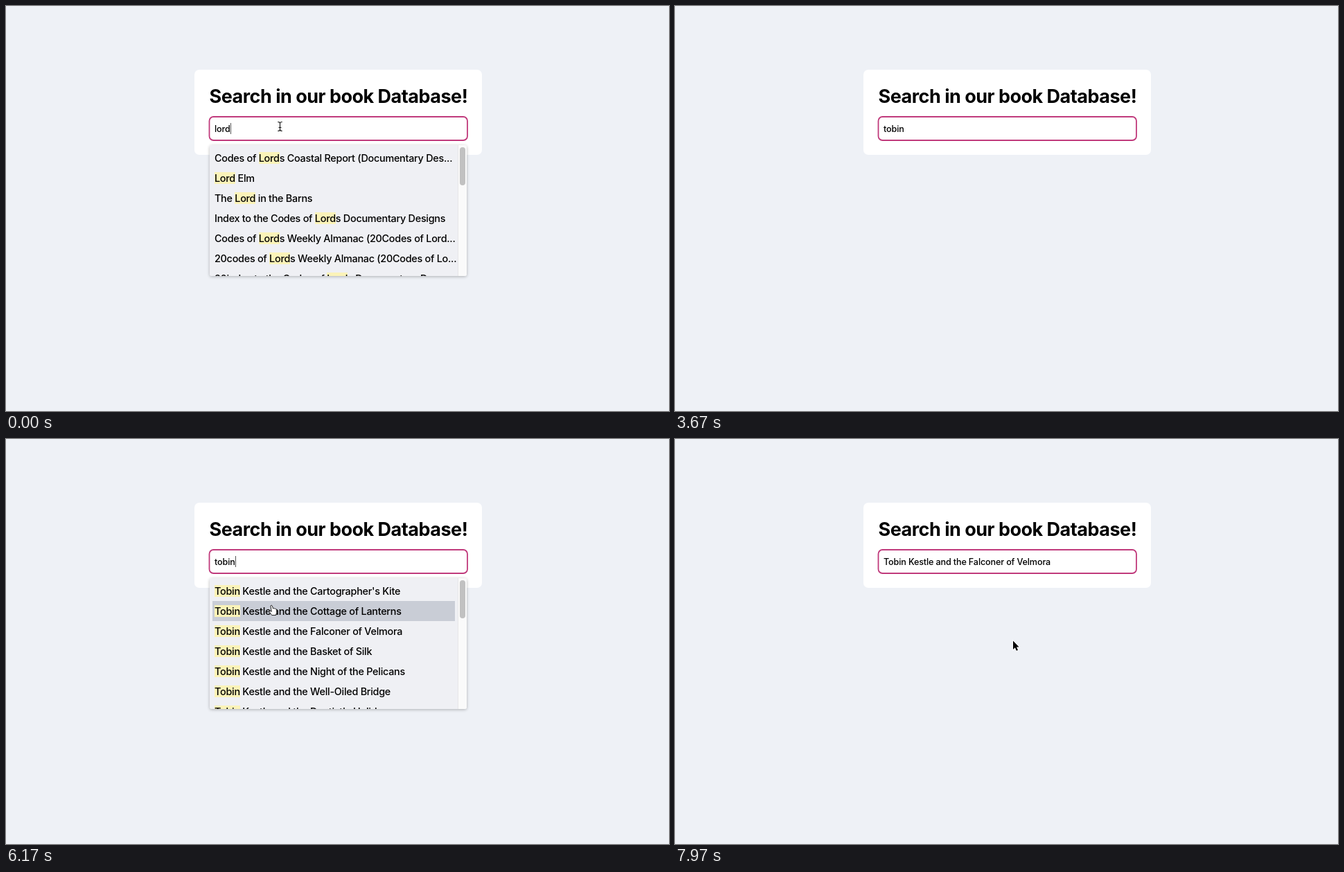
These frames come from a looping animation (957x585 px, 8 s). An HTML page:

```html
<!DOCTYPE html>
<html lang="en">
<head>
<meta charset="utf-8">
<title>Book search</title>
<style>
  html, body { margin: 0; width: 100%; height: 100%; overflow: hidden; background: #eef1f6; }
  body { position: relative; color: #000; font-family: Inter, sans-serif; font-weight: 450; font-optical-sizing: none; }
  body * { position: absolute; box-sizing: border-box; white-space: pre; }
  #card { left: 272px; top: 92px; width: 415px; height: 123px; border-radius: 7px; background: #fff; }
  h1 { left: 21.5px; top: 18.5px; margin: 0; font: 700 27px/40px Inter, sans-serif; letter-spacing: -.0185em; }
  #field { left: 0; top: 0; width: 100%; height: 100%; fill: none; stroke: #c03a7c; stroke-width: 1.8; }
  #query { left: 29px; top: 75.5px; height: 19px; font-size: 12.6px; line-height: 19px; letter-spacing: -.14px; }
  #query.selected { background: #a9cdf4; }
  #caret { left: 100%; top: 1.5px; width: 1px; height: 16px; background: #555; }
  #list { left: 294px; top: 201px; width: 371px; height: 189px; overflow: hidden; border-radius: 3px; background: #eff0f4; }
  #shadow { left: 294px; top: 201px; width: 371px; height: 189px; border-radius: 3px; box-shadow: 0 1px 4px rgba(0, 0, 0, .28); }
  .row { left: 3.5px; width: 350.5px; height: 29.1px; padding-left: 3.5px; font-size: 14.4px; line-height: 29.1px; letter-spacing: -.27px; }
  .row.hover { background: #c9cdd6; }
  .row mark { position: static; color: inherit; background: #fbf3b8; }
  #track { right: 0; top: 0; width: 13px; height: 100%; border-left: 1px solid #e6e6e8; background: #fafafa; }
  #thumb { left: 2px; top: 3px; width: 8px; height: 55px; border-radius: 4px; background: #c1c1c1; }
  #mouse { left: 0; top: 0; width: 20px; height: 24px; overflow: visible; }
</style>
</head>
<body>
<div id="card">
  <h1>Search in our book Database!</h1>
  <svg id="field"><rect x="21.5" y="68" width="372.5" height="34" rx="6"/></svg>
  <span id="query"><span id="text" style="position:static"></span><i id="caret"></i></span>
</div>
<div id="shadow"></div>
<div id="list"><div id="rows"></div><div id="track"><div id="thumb"></div></div></div>
<svg id="mouse">
  <g id="ibeam" fill="none" stroke-linecap="round">
    <path d="M-2.8-6.5Q0-6.5 0-4.5Q0-6.5 2.8-6.5M0-4.5V4.5M-2.8 6.5Q0 6.5 0 4.5Q0 6.5 2.8 6.5M-1.5 1.5H1.5" stroke="#fff" stroke-width="2.4"/>
    <path d="M-2.8-6.5Q0-6.5 0-4.5Q0-6.5 2.8-6.5M0-4.5V4.5M-2.8 6.5Q0 6.5 0 4.5Q0 6.5 2.8 6.5M-1.5 1.5H1.5" stroke="#111" stroke-width="1.1"/>
  </g>
  <path id="arrow" d="M0-.5V12L2.8 9.3L4.8 13.8L7 12.9L5 8.6H8.6Z" fill="#000" stroke="#fff" stroke-width="1.6" paint-order="stroke"/>
  <path id="hand" d="M-1.6 1Q-.3-.8 .8 1L2 5Q3.2 3.8 3.8 5Q5 4.2 5.6 5.6Q7 5.2 7.2 7V10.5L6 14.5H.2L-3.4 9.6Q-3.4 7.6 -1.4 8.4L-.2 9.4Z" fill="#fff" stroke="#111" stroke-width=".9" stroke-linejoin="round"/>
</svg>
<script>
const $ = id => document.getElementById(id);
const LOOP = 8000, ROW_TOP = 204.5, ROW_HEIGHT = 29.1;

const results = {
  lord: [
    "Codes of Lords Coastal Report (Documentary Des...",
    "Lord Elm",
    "The Lord in the Barns",
    "Index to the Codes of Lords Documentary Designs",
    "Codes of Lords Weekly Almanac (20Codes of Lord...",
    "20codes of Lords Weekly Almanac (20Codes of Lo...",
    "20index to the Codes of Lords Documentary Des..."
  ],
  tobin: [
    "Cartographer's Kite", "Cottage of Lanterns", "Falconer of Velmora", "Basket of Silk",
    "Night of the Pelicans", "Well-Oiled Bridge", "Dentist's Holiday"
  ].map(tail => "Tobin Kestle and the " + tail)
};

// Each entry holds from its time until the next one.
const typing = [[0, "lord"], [1830, ""], [2500, "t"], [2570, "to"], [2770, "tob"],
  [2930, "tobi"], [3170, "tobin"], [7030, results.tobin[2]]];
const listing = [[0, "lord"], [1830, ""], [5530, "tobin"], [7030, ""]];
const blinking = [[0, 1], [100, 0], [530, 1], [1030, 0], [1470, 1], [1500, 0], [1830, 1], [2330, 0],
  [2500, 1], [3670, 0], [4170, 1], [4670, 0], [5170, 1], [5670, 0], [6170, 1], [6670, 0], [7030, 1], [7500, 0]];
const pointing = [[0, "ibeam"], [1800, ""], [4170, "ibeam"], [4300, "arrow"], [5960, "hand"], [7000, "arrow"]];

// Time, x, y of the pointer's hot spot.
const path = [[0, 395.5, 174], [4170, 395.5, 174], [4400, 390, 198], [4670, 390, 198], [4870, 388.5, 199],
  [5900, 388.5, 199], [6170, 383.5, 240], [6400, 382, 320], [6700, 386.5, 283], [7500, 386.5, 283], [7970, 488, 292]];

const current = (steps, t) => steps.findLast(step => step[0] <= t)[1];

function pointerAt(t) {
  const i = path.findIndex(point => point[0] > t);
  if (i < 0) return path.at(-1).slice(1);
  const [t0, x0, y0] = path[i - 1], [t1, x1, y1] = path[i];
  const u = (t - t0) / (t1 - t0), k = u * u * (3 - 2 * u);
  return [x0 + (x1 - x0) * k, y0 + (y1 - y0) * k];
}

let shownList = null;
function showList(name) {
  if (name === shownList) return;
  shownList = name;
  $("list").hidden = $("shadow").hidden = !name;
  $("rows").innerHTML = (results[name] || []).map((title, i) =>
    `<div class="row" style="top:${ROW_TOP - 201 + i * ROW_HEIGHT}px">` +
    title.replace(new RegExp(name, "i"), "<mark>$&</mark>") + "</div>").join("");
}

function draw(t) {
  const [x, y] = pointerAt(t), kind = current(pointing, t);
  $("text").textContent = current(typing, t);
  $("query").className = t >= 1500 && t < 1830 ? "selected" : "";
  $("caret").hidden = !current(blinking, t);
  showList(current(listing, t));
  const hovered = t >= 5530 ? Math.floor((y - ROW_TOP) / ROW_HEIGHT) : -1;
  [...$("rows").children].forEach((row, i) => row.classList.toggle("hover", i === hovered));
  for (const name of ["ibeam", "arrow", "hand"]) $(name).style.display = name === kind ? "" : "none";
  $("mouse").style.transform = `translate(${x}px, ${y}px)`;
}

const start = performance.now();
function tick() {
  draw((performance.now() - start) % LOOP);
  requestAnimationFrame(tick);
}
tick();
</script>
</body>
</html>
```
